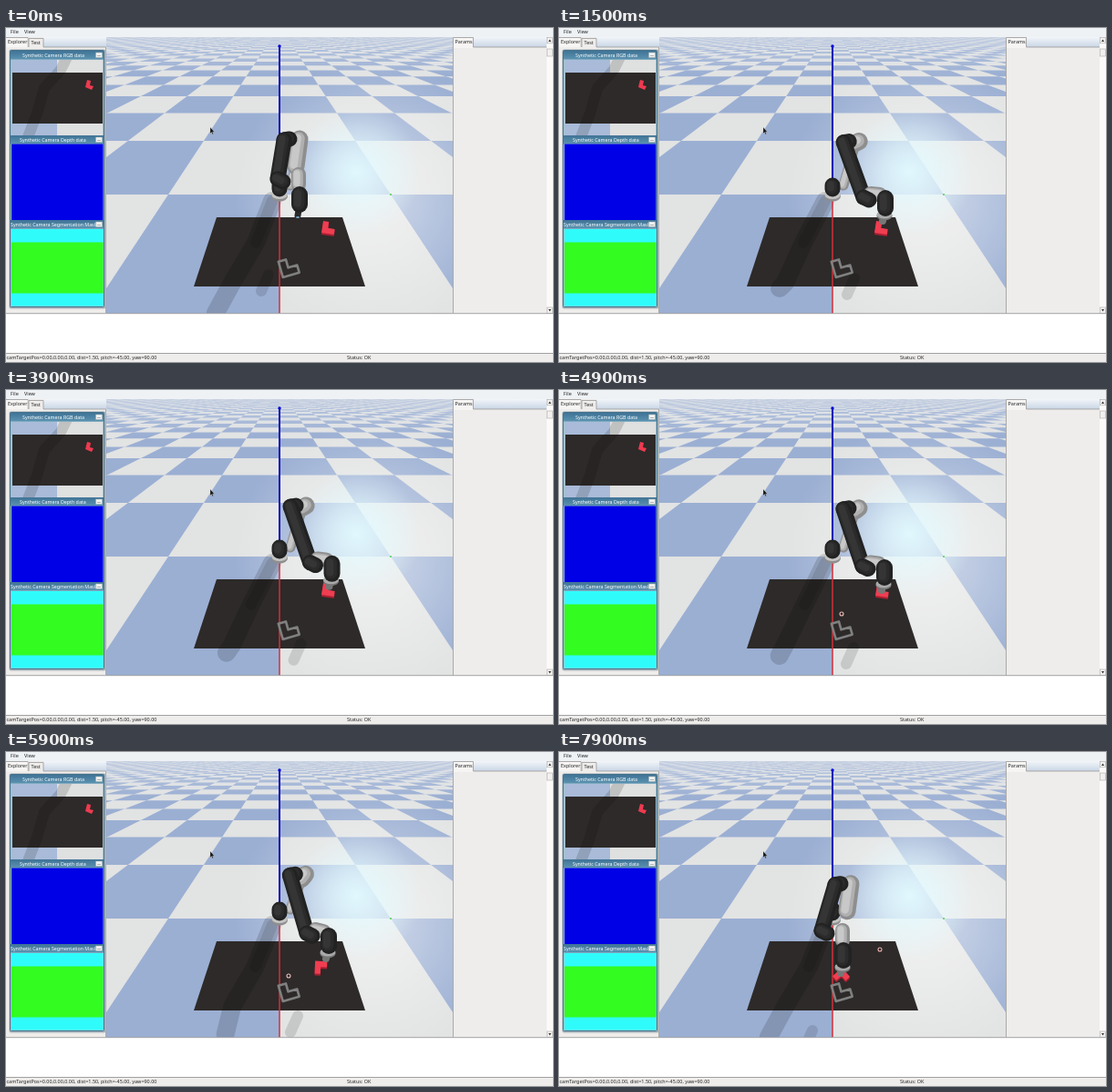
These frames come from a looping animation (600x367 px, 8000 ms). An HTML page with a canvas:

```html
<!DOCTYPE html>
<html lang="en">
<head>
<meta charset="utf-8">
<title>Robot arm simulation</title>
<style>
html, body { margin: 0; width: 100%; height: 100%; overflow: hidden; background: #f0eeec; }
canvas, svg { position: absolute; left: 0; top: 0; width: 600px; height: 367px; }
text { font: 5.45px "Noto Sans", "Open Sans", sans-serif; fill: #222; }
.title text { font-size: 5.3px; fill: #fff; }
</style>
</head>
<body>
<canvas id="scene" width="600" height="367"></canvas>
<svg viewBox="0 0 600 367">
  <defs>
    <linearGradient id="bar" x2="0" y2="1">
      <stop offset="0" stop-color="#3f7396"/><stop offset="1" stop-color="#5c93b0"/>
    </linearGradient>
    <linearGradient id="strip" x2="0" y2="1">
      <stop offset="0" stop-color="#f2f5f9"/><stop offset="1" stop-color="#c9d6e6"/>
    </linearGradient>
    <clipPath id="titleClip"><rect x="4" y="212" width="94" height="10"/></clipPath>
    <clipPath id="photo"><rect x="7" y="35" width="99" height="83"/></clipPath>
    <g id="header">
      <rect x="5" width="102" height="9.5" fill="url(#bar)"/>
      <rect x="98.500" y="2" width="7" height="5.500" fill="#f1f2f2" stroke="#9aa" stroke-width=".5"/>
      <path d="M100 5.500h4" stroke="#888" stroke-width=".6"/>
    </g>
  </defs>
  <rect width="600" height="10" fill="#eff2f5"/>
  <text x="5" y="6.300">File</text><text x="20" y="6.300">View</text>

  <rect y="10" width="110" height="304" fill="#efedeb"/>
  <path d="M41 10H110V21H41zM513 10H593V21H513z" fill="url(#strip)"/>
  <path d="M0 21V10.5H24V21M25 21V11.5H41V21H109.5V313.5" fill="none" stroke="#999" stroke-width=".8"/>
  <rect y="11" width="23.5" height="10" fill="#f6f5f4"/>
  <text x="2" y="17.400">Explorer</text><text x="27.500" y="17.700">Test</text>

  <rect x="3.5" y="23.5" width="106" height="285" rx="2" fill="#a9b4ba"/>
  <rect x="4.5" y="24.5" width="103" height="282" rx="1" fill="#9fc0d0" stroke="#49748d"/>
  <use href="#header" y="25"/><use href="#header" y="118"/><use href="#header" y="211"/>
  <g class="title">
    <text x="18" y="31.5">Synthetic Camera RGB data</text>
    <text x="15" y="124.7">Synthetic Camera Depth data</text>
    <text x="5" y="217.8" clip-path="url(#titleClip)">Synthetic Camera Segmentation Mask</text>
  </g>

  <g clip-path="url(#photo)">
    <rect x="7" y="35" width="99" height="83" fill="#dfe0e0"/>
    <rect x="7" y="35" width="49" height="83" fill="#a9bbd9"/>
    <rect x="7" y="49" width="99" height="56" fill="#2d2a29"/>
    <path d="M68 30L60 46 42 66 34 94 24 120" fill="none" stroke="#000" stroke-opacity=".14"
      stroke-width="12" stroke-linejoin="round"/>
    <path d="M89 57l4 1 -1 5 4 1 -2 4 -7-3z" fill="#ee3a50"/>
  </g>
  <rect x="6" y="127.5" width="100.5" height="83.5" fill="#0000e6"/>
  <rect x="6" y="221" width="100.5" height="84.5" fill="#2ffcfa"/>
  <rect x="6" y="235.5" width="100.5" height="56" fill="#32fc20"/>

  <rect x="490" y="21" width="110" height="293" fill="#efedeb"/>
  <path d="M490.5 314V10.5H512.5V21H593" fill="none" stroke="#999" stroke-width=".8"/>
  <rect x="491" y="11" width="21" height="11" fill="#f6f5f4"/>
  <text x="492.5" y="17.4">Params</text>
  <rect x="593" y="10" width="7" height="304" fill="#fbfaf9"/>
  <g fill="#f1f0ef" stroke="#aaa" stroke-width=".6">
    <rect x="593.3" y="10.3" width="6.3" height="6.5"/>
    <rect x="593.3" y="23" width="6.3" height="8"/>
    <rect x="593.3" y="307" width="6.3" height="6.5"/>
  </g>
  <path d="M595 15l1.5-2.5 1.5 2.5zM595 309l1.5 2.5 1.5-2.5z" fill="#333"/>

  <rect y="313.5" width="600" height="44" fill="#fff"/>
  <path d="M0 313.7H600M0 357.5H600" stroke="#8c8c8c" stroke-width=".8"/>
  <rect y="358" width="600" height="9" fill="#efedeb"/>
  <text x=".5" y="363.5">camTargetPos=0.00,0.00,0.00, dist=1.50, pitch=-45.00, yaw=90.00</text>
  <text x="374" y="363.5">Status: OK</text>
  <path d="M224 109v7l1.5-1.5 1 2.5 1-.5-1-2.3h2z" fill="#111" stroke="#ddd" stroke-width=".3"/>
</svg>
<script>
const LOOP = 8000, STEP = 100, GRAB = 4900;
const DARK = ['#222', '#2b2b2b', '#353535'];
const PALE = ['#8e8e8e', '#b0b0b0', '#c8c8c8'];
const ctx = document.getElementById('scene').getContext('2d');

// The hand's path; every other part of the arm follows from it
const path = [
  { t: 0, x: 322, y: 194 },
  { t: 1100, x: 358, y: 198 },
  { t: 3000, x: 358, y: 198 },
  { t: GRAB, x: 357, y: 206 },
  { t: 5900, x: 354, y: 213 },
  { t: 6700, x: 321, y: 227 },
  { t: 7900, x: 312, y: 229 }
];

const clamp = v => Math.max(0, Math.min(1, v));
const move = (p, x, y) => ({ x: p.x + x, y: p.y + y });

function handAt(t) {
  const i = Math.max(1, path.findIndex(k => k.t >= t));
  const a = path[i - 1], b = path[i], u = (t - a.t) / (b.t - a.t);
  return { x: a.x + (b.x - a.x) * u, y: a.y + (b.y - a.y) * u };
}

function pose(t) {
  const hand = handAt(t);
  const fold = clamp((358 - hand.x) / 36);
  const drag = clamp((t - GRAB) / 3000);
  const swing = (1 - fold) * Math.min(1, 3 * drag);
  const top = { x: 305 + 0.2 * (hand.x - 322), y: 123 + 0.65 * (hand.y - 194) };
  const elbow = move(hand, -24, -30 + 0.45 * (hand.x - 318));
  return {
    hand, fold, top, elbow,
    elbowEnd: move(elbow, 6, 3),
    shoulder: move(top, 17, -1),
    upper: move(top, 13, 1 + 28 * fold),
    wrist: move(hand, -16 + 15 * fold, -16 - 17 * fold),
    wristEnd: move(hand, -6 + 5 * fold, -15 - 7 * fold),
    block: t < GRAB ? { x: 353, y: 221 } : move(hand, -3 - 8 * swing, 16 + 8 * swing),
    turn: 130 * drag ** 0.4 * Math.PI / 180
  };
}

function trace(pts) {
  ctx.beginPath();
  pts.forEach(p => ctx.lineTo(p.x, p.y));
}

function poly(pts, fill) {
  trace(pts);
  ctx.fillStyle = fill;
  ctx.fill();
}

function line(pts, width, color, cap = 'round') {
  trace(pts);
  ctx.lineWidth = width;
  ctx.strokeStyle = color;
  ctx.lineCap = cap;
  ctx.lineJoin = 'round';
  ctx.stroke();
}

function tube(a, b, width, tones) {
  tones.forEach((color, i) => {
    const d = -i * width * 0.06;
    line([move(a, d, d * 0.6), move(b, d, d * 0.6)], width * (1 - i * 0.28), color);
  });
}

function ellipse(x, y, rx, ry, color) {
  ctx.beginPath();
  ctx.ellipse(x, y, rx, ry, 0, 0, 7);
  ctx.fillStyle = color;
  ctx.fill();
}

function glow(x, y, r, color, alpha) {
  const g = ctx.createRadialGradient(x, y, 0, x, y, r);
  g.addColorStop(0, `rgba(${color},${alpha})`);
  g.addColorStop(0.4, `rgba(${color},${alpha * 0.65})`);
  g.addColorStop(1, `rgba(${color},0)`);
  ctx.fillStyle = g;
  ctx.fillRect(110, 10, 380, 304);
}

function floor() {
  const horizon = -2, near = 1 / (183 - horizon), step = 1 / (124 - horizon) - near;
  const depth = n => 1 / (near + n * step);
  ctx.fillStyle = '#e2e3e3';
  ctx.fillRect(110, 10, 380, 304);
  for (let n = -1; n < 30; n++) {
    const d1 = depth(n), d2 = depth(n + 1);
    const corner = (k, d) => ({ x: 300 + k * d * 122 * near, y: horizon + d });
    const span = Math.ceil(190 / (d2 * 122 * near)) + 1;
    for (let k = -span; k < span; k++) {
      if ((k + n) & 1) continue;
      poly([corner(k, d1), corner(k + 1, d1), corner(k + 1, d2), corner(k, d2)], '#9bafd3');
    }
  }
  const haze = ctx.createLinearGradient(0, 10, 0, 50);
  haze.addColorStop(0, 'rgba(205,215,230,.6)');
  haze.addColorStop(1, 'rgba(225,230,238,0)');
  ctx.fillStyle = haze;
  ctx.fillRect(110, 10, 380, 40);
  glow(400, 185, 150, '255,255,255', 0.5);
  glow(384, 158, 72, '226,250,255', 0.95);
}

function ring(x, y, color) {
  ctx.beginPath();
  ctx.arc(x, y, 2, 0, 7);
  ctx.lineWidth = 1.1;
  ctx.strokeStyle = color;
  ctx.stroke();
}

// Outline of an L: a corner square with one arm up and one to the right
function ell(at, turn, size) {
  const c = Math.cos(turn) * size, s = Math.sin(turn) * size;
  return [[-1, -1.3], [0, -1.3], [0, -0.2], [1.2, -0.2], [1.2, 0.8], [-1, 0.8]]
    .map(([x, y]) => move(at, x * c - y * s, x * s + y * c));
}

function shadows({ hand, fold }) {
  const open = Math.min(1, fold * 8);
  const start = { x: 292, y: 190 }, mid = { x: 268 + 6 * open, y: 236 };
  const low = { x: 248, y: 280 }, end = { x: 242 - 12 * fold, y: 286 + 27 * open };
  line([start, mid, low, end], 20, 'rgba(0,0,0,.15)');
  line([start, mid], 12, 'rgba(0,0,0,.1)');
  line([move(hand, -34, 77), move(hand, -42, 95)], 12, 'rgba(0,0,0,.12)');
}

function arm({ hand, top, elbow, elbowEnd, shoulder, upper, wrist, wristEnd }) {
  const base = { x: 300, y: 173 }, { x, y } = hand;
  const free = y < 196;
  ellipse(300, 185, 9, 5.5, '#8f8f8f');
  ellipse(300, 183.5, 8.5, 4.5, '#c4c4c4');
  tube(upper, { x: 312, y: 173 }, 11, PALE);
  tube(base, move(base, 0, 4), 17, DARK);
  tube(shoulder, upper, 19, PALE);
  tube(top, move(top, 6, -1), 17, DARK);
  tube(top, elbow, 17, DARK);
  tube(wrist, wristEnd, 16, PALE);
  tube(elbow, elbowEnd, 17, DARK);
  if (free) {
    line([hand, move(hand, -2, 12)], 7, '#292929');
    ellipse(x - 2, y + 14, 2, 1, '#74a9cf');
  } else {
    line([move(hand, -2, 9), move(hand, -3, 14)], 8, '#777');
    ellipse(x - 1, y + 8.5, 8.5, 5, '#777');
    ellipse(x - 1, y + 7, 8.5, 4.5, '#aaa');
  }
  tube(move(hand, 0, -11), hand, 18, DARK);
}

function draw(t) {
  const p = pose(t);
  ctx.save();
  ctx.beginPath();
  ctx.rect(110, 10, 380, 304);
  ctx.clip();
  floor();

  const tableEdge = (half, y) => [{ x: 300 - half, y }, { x: 300 + half, y }];
  poly([...tableEdge(69, 208), ...tableEdge(94, 284).reverse()], '#2d2a29');
  shadows(p);

  const axis = (y1, y2, width, color) =>
    line([{ x: 300, y: y1 }, { x: 300, y: y2 }], width, color, 'butt');
  axis(20, 170, 2, '#0a0ab4');
  axis(188, 314, 1.5, '#d0303a');
  ellipse(300, 20, 1.7, 1.7, '#0000d8');
  ellipse(422, 183, 1.2, 1, '#5ed35e');

  const goal = ell({ x: 310, y: 265 }, -0.28, 8.5);
  line([...goal, goal[0], goal[1]], 2.6, '#808080');

  poly(ell(move(p.block, 0, 2), p.turn + 0.15, 6.3), '#a91f31');
  poly(ell(p.block, p.turn + 0.15, 6.3), '#f03d51');
  arm(p);
  if (t >= 4500 && t < 7200) ring(310, 246, '#eebcbc');
  if (t >= 6300) ring(352, 217, t < 7200 ? '#4fd35a' : '#eeb0b0');
  ctx.restore();
}

const start = performance.now();
function tick() {
  const t = (performance.now() - start) % LOOP;
  draw(Math.floor(t / STEP) * STEP);
  requestAnimationFrame(tick);
}
tick();
</script>
</body>
</html>
```
